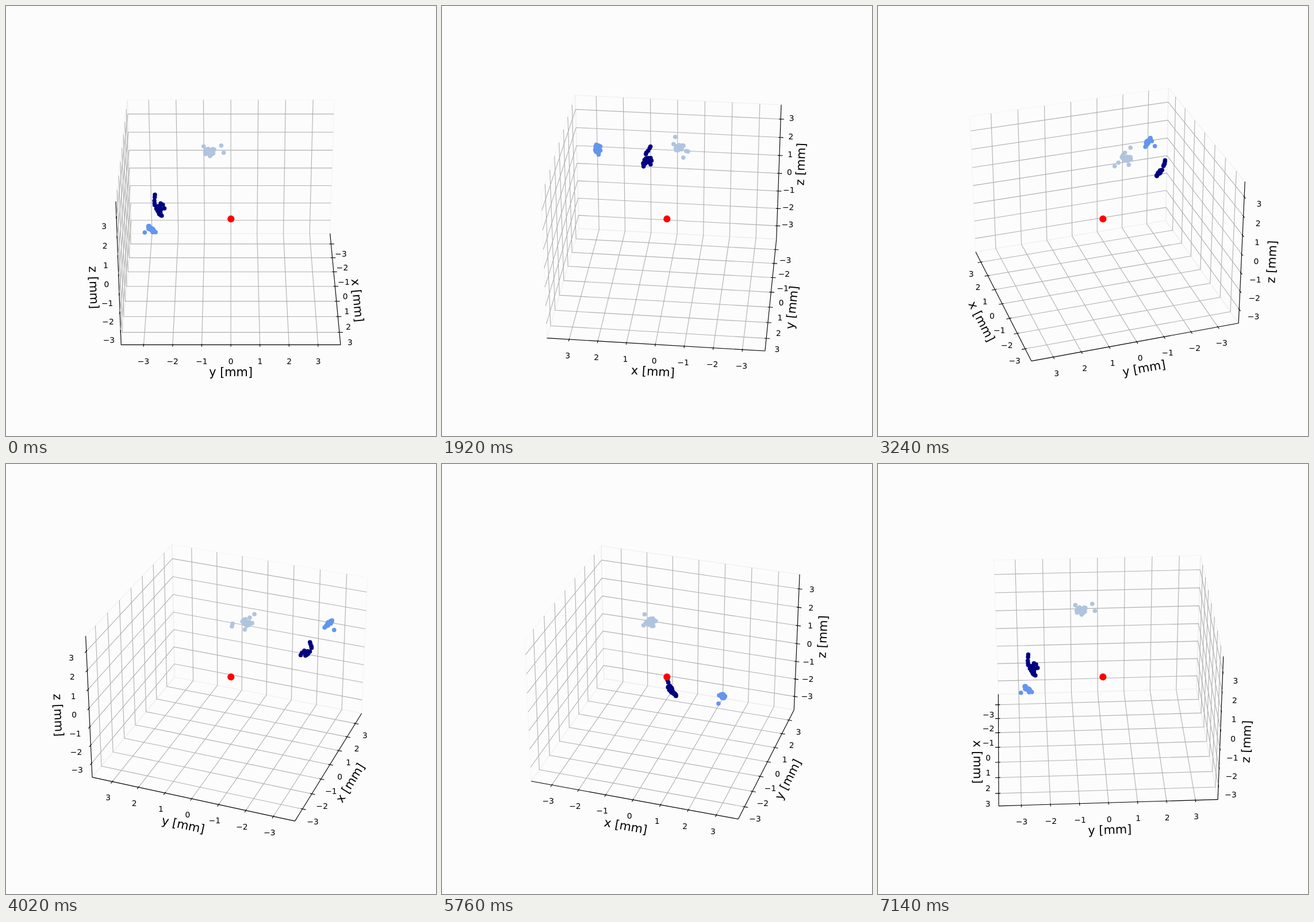
Animation of 748 by 748 pixels, one loop 7200 ms. Source, as an HTML page:

```html
<!DOCTYPE html>
<html lang="en">
<head>
<meta charset="utf-8">
<title>Rotating 3D scatter</title>
<style>
  html, body { margin: 0; width: 100%; height: 100%; overflow: hidden; background: #fcfcfc; }
  svg { display: block; width: 748px; height: 748px; }
  text { font-family: "DejaVu Sans", sans-serif; text-anchor: middle; }
  .tick { font-size: 13.89px; }
  .label { font-size: 20.83px; }
  path { fill: none; stroke-width: 1.11; }
  .pane { stroke-width: 1.39; stroke-opacity: 0.5; }
</style>
</head>
<body>
<svg id="stage" viewBox="0 0 748 748"></svg>
<script>
const STEP_MS = 60, STEPS = 120;
const CENTER_X = 391.13, CENTER_Y = 369.96;
const FOCAL = 3113, DISTANCE = 10, ELEV = Math.PI / 6;
const LIMIT = 3.625, MAX_TICK = 3;
const HALF = [4 / 7, 4 / 7, 3 / 7];
const DELTA = HALF.map(h => h / 6);
const EDGE = HALF.map(h => h * 25 / 24);
const TICK_PAD = 0.63, LABEL_PAD = 1.33;

// across: dimension in which the axis line moves to the front side and its ticks point
const AXES = [
  { name: "x", across: 1, pane: "#f2f2f2" },
  { name: "y", across: 0, pane: "#e6e6e6" },
  { name: "z", across: 0, pane: "#ececec" }
];

let seed = 7;
function random() {
  seed = (seed * 16807) % 2147483647;
  return seed / 2147483647;
}
const spread = () => random() + random() - 1;
const addScaled = (p, v, s) => p.map((c, k) => c + v[k] * s);
const lerp = (a, b, t) => a.map((c, k) => c + (b[k] - c) * t);

// Random points in a slanted sheet spanned by two directions, with some thickness
function sheet(center, u, v, thickness, count) {
  return Array.from({ length: count }, () =>
    addScaled(addScaled(center, u, spread()), v, spread()).map(c => c + spread() * thickness));
}

function strand(from, to, count) {
  return Array.from({ length: count }, (_, n) =>
    lerp(from, to, n / (count - 1)).map(c => c + spread() * 0.005));
}

const CLUSTERS = [
  {
    color: "#b0c4de",
    points: [
      ...sheet([-0.055, -0.12, 0.388], [0.02, 0, 0], [0, 0.015, 0], 0.026, 26),
      ...strand([-0.115, -0.054, 0.404], [-0.087, -0.041, 0.369], 2),
      [-0.031, -0.149, 0.439]
    ]
  },
  {
    color: "#000080",
    points: [
      ...sheet([0.155, -0.386, 0.146], [0.032, -0.019, -0.011], [0, 0.018, -0.02], 0.005, 26),
      ...strand([0.137, -0.417, 0.229], [0.165, -0.418, 0.178], 5)
    ]
  },
  {
    color: "#6495ed",
    points: [
      ...sheet([0.443, -0.418, 0.188], [-0.008, 0.027, -0.029], [0.015, 0, 0], 0.009, 20),
      [0.435, -0.459, 0.166]
    ]
  }
];

function camera(azimuth) {
  const c = Math.cos(azimuth), s = Math.sin(azimuth);
  const ce = Math.cos(ELEV), se = Math.sin(ELEV);
  const depth = ([x, y, z]) => (c * x + s * y) * ce + z * se;
  const project = p => {
    const [x, y, z] = p, scale = FOCAL / (DISTANCE - depth(p));
    return [
      CENTER_X + (c * y - s * x) * scale,
      CENTER_Y - (z * ce - (c * x + s * y) * se) * scale
    ];
  };
  // side of the box that lies at the back, per dimension
  const back = [c < -1e-9 ? 1 : -1, s < -1e-9 ? 1 : -1, -1];
  return { project, depth, back };
}

const withValue = (p, i, value) => p.map((v, k) => k === i ? value : v);
const outward = (p, i, amount) =>
  p.map((v, k) => k === i ? v : v + Math.sign(v) * amount * DELTA[k]);
const format = v => (v < 0 ? "\u2212" : "") + Math.abs(v);

function drawing(azimuth) {
  const { project, depth, back } = camera(azimuth);
  const backCorner = back.map((s, k) => s * EDGE[k]);
  const frontCorner = backCorner.map(v => -v);
  const toFront = (p, k) => withValue(p, k, frontCorner[k]);

  const line = (points, color, extra = "") =>
    `<path ${extra} stroke="${color}" d="M${points.map(p =>
      project(p).map(v => v.toFixed(2)).join(" ")).join("L")}"/>`;
  const circle = ([x, y], r, color) =>
    `<circle cx="${x.toFixed(2)}" cy="${y.toFixed(2)}" r="${r}" fill="${color}"/>`;

  function drawPane(axis, i) {
    const j = (i + 1) % 3, k = (i + 2) % 3;
    const a = backCorner, b = toFront(a, j);
    return line([a, b, toFront(b, k), toFront(a, k), a], axis.pane, 'class="pane"');
  }

  function drawLabel(axis, i, start, end) {
    const [x0, y0] = project(start), [x1, y1] = project(end);
    let angle = (Math.atan2(y0 - y1, x1 - x0) * 180 / Math.PI + 180) % 180;
    if (angle > 90) angle -= 180;
    const [x, y] = project(outward(withValue(start, i, 0), i, LABEL_PAD));
    return `<text class="label" y="5.75" transform="translate(${x.toFixed(2)} ${y.toFixed(2)}) ` +
      `rotate(${(-angle).toFixed(3)})">${axis.name} [mm]</text>`;
  }

  function drawAxis(axis, i) {
    const j = (i + 1) % 3, k = (i + 2) % 3, dir = axis.across;
    const start = toFront(backCorner, dir), end = toFront(start, i);
    const unit = back[dir] * DELTA[dir];
    let grid = "", ticks = "";
    for (let t = -MAX_TICK; t <= MAX_TICK; t++) {
      const place = t / LIMIT * HALF[i];
      const corner = withValue(backCorner, i, place), pos = withValue(start, i, place);
      grid += line([toFront(corner, j), corner, toFront(corner, k)], "#b0b0b0");
      ticks += line([withValue(pos, dir, pos[dir] + 0.1 * unit),
                     withValue(pos, dir, pos[dir] - 0.2 * unit)], "#000");
      const [x, y] = project(outward(pos, i, TICK_PAD));
      ticks += `<text class="tick" x="${x.toFixed(2)}" y="${Math.round(y + 10.8)}">${format(t)}</text>`;
    }
    return line([start, end], "#000") + drawLabel(axis, i, start, end) + grid + ticks;
  }

  const dots = CLUSTERS.slice()
    .sort((a, b) => depth(a.points[0]) - depth(b.points[0]))
    .map(({ color, points }) => points.map(p => circle(project(p), 3.75, color)).join(""));

  return AXES.map(drawPane).join("") + AXES.map(drawAxis).join("") +
    dots.join("") + circle([CENTER_X + 0.2, CENTER_Y + 0.5], 6.1, "#f00");
}

const stage = document.getElementById("stage");
let shown = -1;
function update(time) {
  const step = Math.floor(time / STEP_MS) % STEPS;
  if (step === shown) return;
  shown = step;
  stage.innerHTML = drawing(step / STEPS * 2 * Math.PI);
}

let begin = null;
function frame(now) {
  if (begin === null) begin = now;
  update(now - begin);
  requestAnimationFrame(frame);
}
update(0);
requestAnimationFrame(frame);
</script>
</body>
</html>
```
